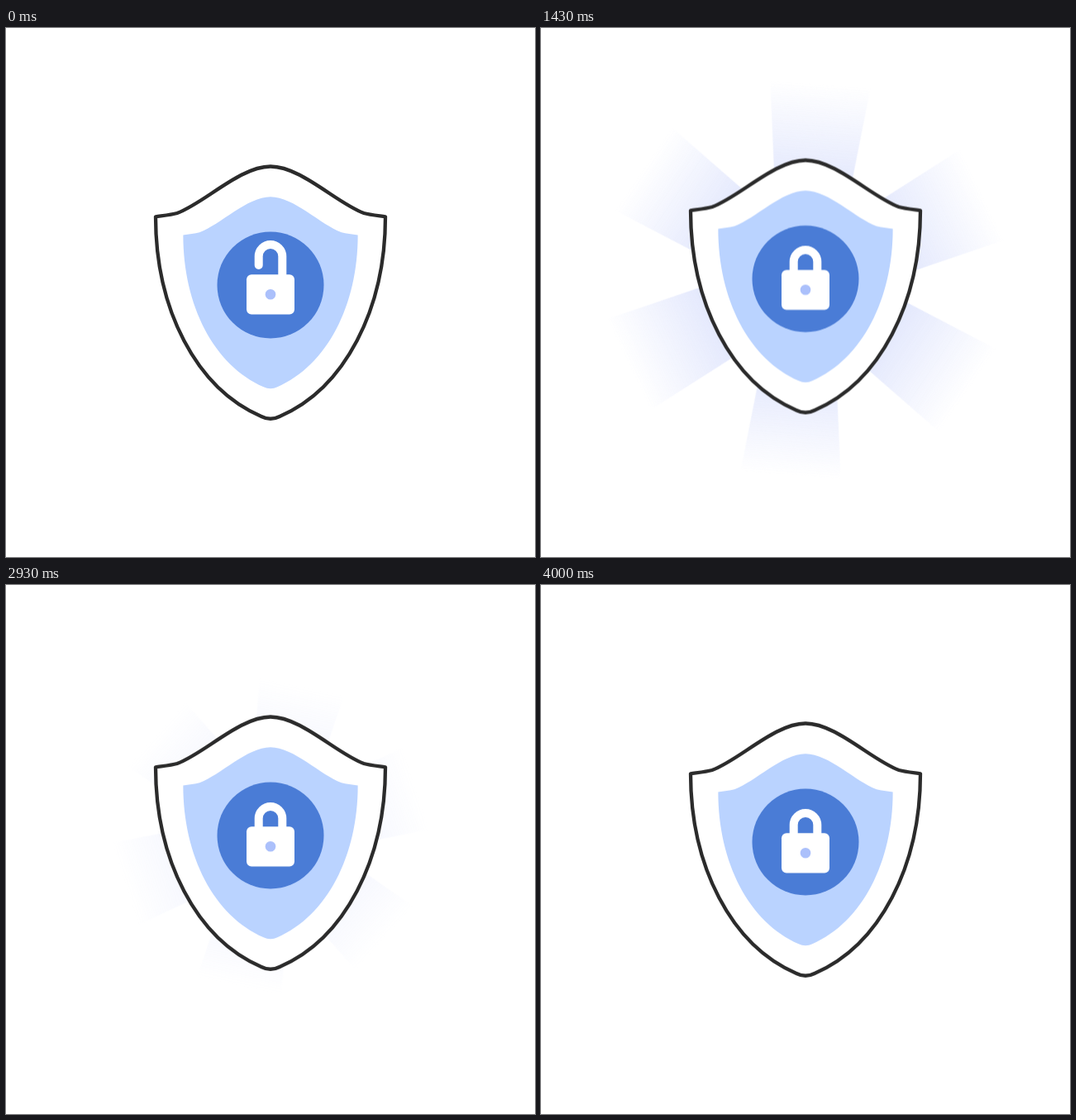
An HTML page for the animation above (4.07 s loop, 640 px wide and 640 px high).

```html
<!DOCTYPE html>
<html lang="en">
<head>
<meta charset="utf-8">
<title>Shield lock</title>
<style>
html, body { margin: 0; width: 100%; height: 100%; overflow: hidden; background: #fff; }
svg { display: block; width: 100vw; height: 100vh; }
</style>
</head>
<body>
<svg viewBox="0 0 640 640">
  <defs>
    <linearGradient id="fade" gradientUnits="userSpaceOnUse" x1="0" y1="0" x2="250" y2="0">
      <stop offset="0" stop-color="#a9b8f8"/>
      <stop offset="1" stop-color="#a9b8f8" stop-opacity="0"/>
    </linearGradient>
    <path id="ray" fill="url(#fade)"/>
    <path id="crest" d="M320 167.5 C283 167.5 240 212 207 224 C200 226 190 227 181 228.3
      C181 340 230 436 309 470 C316 473.5 324 473.5 331 470
      C410 436 459 340 459 228.3 C450 227 440 226 433 224 C400 212 357 167.5 320 167.5 Z"/>
  </defs>
  <g id="float">
    <g id="rays"></g>
    <use href="#crest" fill="#fff" stroke="#2b2b2b" stroke-width="4.3" stroke-linejoin="round"/>
    <use href="#crest" fill="#bad3ff" transform="translate(320 320.8) scale(.76) translate(-320 -320.8)"/>
    <circle cx="320" cy="311" r="64.5" fill="#4a7cd6"/>
    <g id="lock">
      <path id="shackle" d="M305.7 287 V276.3 A14.3 14.3 0 0 1 334.3 276.3 V302"
        fill="none" stroke="#fff" stroke-width="10" stroke-linecap="round"/>
      <rect x="291" y="298.2" width="58" height="48.2" rx="6" fill="#fff"/>
      <circle cx="320" cy="322.3" r="6.3" fill="#abc0fb"/>
    </g>
  </g>
</svg>
<script>
const LOOP = 4070, PEAK = 2300;
const $ = id => document.getElementById(id);
const clamp = v => Math.min(1, Math.max(0, v));
const span = (t, a, b) => clamp((t - a) / (b - a));
const smooth = u => u * u * (3 - 2 * u);
const move = (id, y) => $(id).setAttribute('transform', `translate(0 ${y.toFixed(3)})`);

$('rays').innerHTML = [0, 1, 2, 3, 4, 5]
  .map(i => `<use href="#ray" transform="rotate(${i * 60})"/>`).join('');

// Height of the float: brisk rise, slower start on the way down
function lift(t) {
  if (t < PEAK) {
    const u = t / PEAK;
    return 5 * (smooth(u) + Math.sin(u * Math.PI / 2));
  }
  return 10 * (1 - smooth(Math.pow(span(t, PEAK, LOOP), 1.2)));
}

function drawRays(t) {
  const grow = 1 - Math.pow(1 - span(t, 660, 980), 3);
  const len = (287.5 - 0.0351 * t) * (0.4 + 0.6 * grow);
  const end = 0.17 * len + 20.5;
  const start = 90;
  const near = end - 0.12 * (len - start);
  $('ray').setAttribute('d', `M${start} ${-near} L${len} ${-end} V${end} L${start} ${near} Z`);
  $('fade').setAttribute('x2', len);
  $('rays').setAttribute('transform', `translate(320 312) rotate(${0.045 * t - 30})`);
  $('rays').setAttribute('opacity', grow * clamp(1 - t / 4000));
}

function render(t) {
  const shut = smooth(span(t, 610, 800));
  move('float', -lift(t));
  move('lock', 2 * shut);
  move('shackle', 12 * shut);
  drawRays(t);
}

let begin = null;
function tick(now) {
  if (begin === null) begin = now;
  render((now - begin) % LOOP);
  requestAnimationFrame(tick);
}
render(0);
requestAnimationFrame(tick);
</script>
</body>
</html>
```
